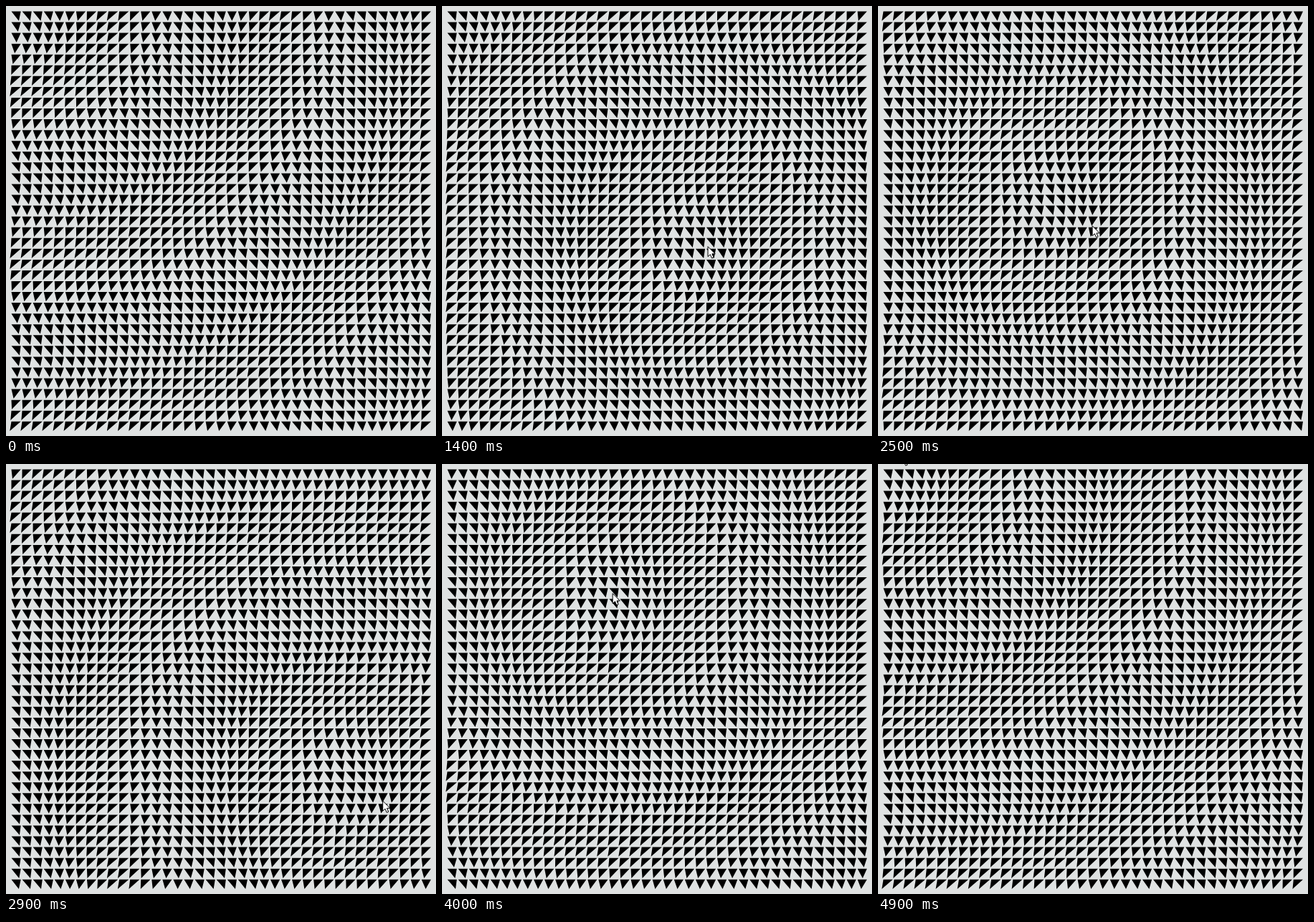
Recreate the animation shown at these times as an HTML page with a canvas. Size 600 by 600 pixels, loop 5.3 s.

```html
<!DOCTYPE html>
<html lang="en">
<head>
<meta charset="utf-8">
<title>Triangle ripple</title>
<style>
  html, body { margin: 0; width: 100%; height: 100%; overflow: hidden; background: #dfe2e2; }
  canvas { display: block; width: 600px; height: 600px; }
</style>
</head>
<body>
<canvas id="stage" width="600" height="600"></canvas>
<script>
const ctx = document.getElementById('stage').getContext('2d');
const LOOP = 5300, HOLD = 400, STEP = 100, LAST = 46;
const CELLS = 39, PITCH = 15.06, START = 7.5, SIZE = 13.2;
const WAVE = 37.5, REST = 0.35, SWING = 0.52;

// Pointer path: step, position, velocity per step
const path = [
  [0, 32, 3, 35, 70],
  [3, 99, 173, 1, 25],
  [11, 360, 335, 16, 14],
  [18, 232, 188, -52, 12],
  [26, 483, 435, 58, 50],
  [37, 248, 182, -3, 4],
  [46, 32, 3, 1, -17]
];

function hermite(p, q, v, w, u, span) {
  const u2 = u * u, u3 = u2 * u;
  return p * (2 * u3 - 3 * u2 + 1) + q * (3 * u2 - 2 * u3)
    + span * (v * (u3 - 2 * u2 + u) + w * (u3 - u2));
}

function pointerAt(step) {
  const end = path[path.length - 1];
  if (step > end[0]) {
    const extra = step - end[0];
    return [end[1] + end[3] * extra, end[2] + end[4] * extra];
  }
  const i = path.findIndex((key, n) => n > 0 && step <= key[0]);
  const a = path[i - 1], b = path[i], span = b[0] - a[0];
  const u = (step - a[0]) / span;
  return [1, 2].map(k => hermite(a[k], b[k], a[k + 2], b[k + 2], u, span));
}

function drawTriangles([cx, cy]) {
  ctx.fillStyle = '#000';
  ctx.beginPath();
  for (let row = 0; row < CELLS; row++) {
    for (let col = 0; col < CELLS; col++) {
      const x = START + col * PITCH, y = START + row * PITCH;
      const distance = Math.hypot(x + SIZE / 2 - cx, y + SIZE / 2 - cy);
      const lean = REST + SWING * Math.cos(distance / WAVE);
      ctx.moveTo(x, y);
      ctx.lineTo(x + SIZE, y);
      ctx.lineTo(x + SIZE * lean, y + SIZE);
      ctx.closePath();
    }
  }
  ctx.fill();
}

const arrow = new Path2D('M0 0V14L3.3 11L5.6 16.2L8 15.2L5.8 10.2H10.2Z');

function drawPointer([x, y]) {
  ctx.save();
  ctx.translate(x, y);
  ctx.fillStyle = '#fff';
  ctx.strokeStyle = '#000';
  ctx.lineWidth = 1;
  ctx.fill(arrow);
  ctx.stroke(arrow);
  ctx.restore();
}

let shown = -1;
const origin = performance.now();

function frame() {
  const t = Math.max(0, performance.now() - origin) % LOOP;
  const step = Math.max(0, Math.min(LAST, Math.floor((t - HOLD) / STEP) + 1));
  if (step !== shown) {
    shown = step;
    ctx.fillStyle = '#dfe2e2';
    ctx.fillRect(0, 0, 600, 600);
    drawTriangles(pointerAt(step));
    if (step > 0) drawPointer(pointerAt(step + 1));
  }
  requestAnimationFrame(frame);
}
frame();
</script>
</body>
</html>
```
